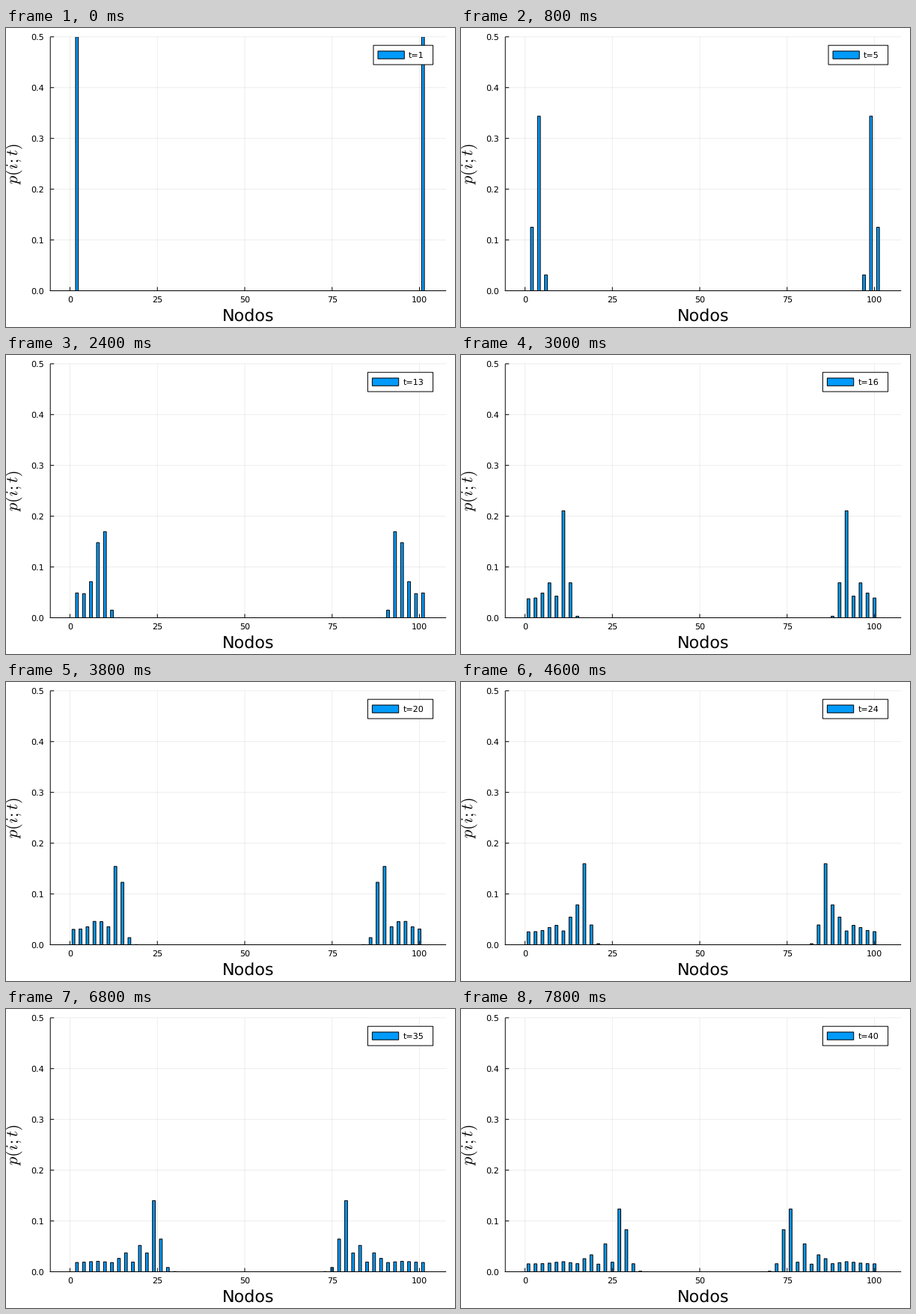
Write a matplotlib script that moves like this. It is 600 by 400 pixels and loops after 8 s.

```python
import numpy as np
import matplotlib.pyplot as plt
from matplotlib.animation import FuncAnimation
from matplotlib.patches import Rectangle

W, H, DPI = 600, 400, 100
PX = 72 / DPI                                  # one pixel in points
LEFT, RIGHT, TOP, BOTTOM = 59.2, 588.2, 11.8, 351.5
X_MIN, X_MAX, Y_MAX = -5.63, 107.63, 0.5
NODES, STEPS, BAR = 101, 40, 0.8
BLUE = "#009afa"

plt.rcParams.update({
    "font.family": "DejaVu Sans",
    "mathtext.fontset": "cm",
    "text.hinting": "none",
})


def px(x):
    return LEFT + (x - X_MIN) / (X_MAX - X_MIN) * (RIGHT - LEFT)


def py(y):
    return BOTTOM - y / Y_MAX * (BOTTOM - TOP)


def quantum_walk():
    """Node probabilities of a Hadamard walk on a ring, after each step."""
    psi = np.zeros((2, NODES), complex)
    psi[:, 0] = 1 / np.sqrt(2), 1j / np.sqrt(2)
    probs = []
    for _ in range(STEPS):
        up, down = (psi[0] + psi[1]) / np.sqrt(2), (psi[0] - psi[1]) / np.sqrt(2)
        psi = np.array([np.roll(up, 1), np.roll(down, -1)])
        probs.append((abs(psi) ** 2).sum(axis=0))
    return probs


fig = plt.figure(figsize=(W / DPI, H / DPI), dpi=DPI, facecolor="white")
ax = fig.add_axes([0, 0, 1, 1])
ax.set_xlim(0, W)
ax.set_ylim(H, 0)
ax.axis("off")


def line(x0, y0, x1, y1, z=3, **style):
    ax.plot([x0, x1], [y0, y1], color="black", lw=PX, snap=False,
            solid_capstyle="butt", zorder=z, **style)


def box(x, y, w, h, fill, z):
    rect = Rectangle((x, y), w, h, fc=fill, ec="black", lw=PX,
                     snap=False, joinstyle="miter", zorder=z)
    return ax.add_patch(rect)


def label(x, y, text, size=8, **kw):
    return ax.text(x, y, text, fontsize=size, zorder=6, **kw)


for v in range(0, 101, 25):
    x = px(v)
    line(x, TOP, x, BOTTOM, z=1, alpha=0.07)
    line(x, BOTTOM, x, BOTTOM - 5)
    label(x, 367.2, str(v), ha="center")
for i in range(6):
    y = py(i / 10)
    line(LEFT, y, RIGHT, y, z=1, alpha=0.07)
    line(LEFT, y, LEFT + 5, y)
    label(51, y + 4.1, f"{i / 10:.1f}", ha="right")
line(LEFT, TOP, LEFT, BOTTOM + 0.5)
line(LEFT - 0.5, BOTTOM, RIGHT, BOTTOM)
label((LEFT + RIGHT) / 2, 393, "Nodos", 16, ha="center")
label(20, (TOP + BOTTOM) / 2, "$p(i;t)$", 16, rotation=90,
      ha="right", va="center", rotation_mode="default").set_x(25.5)

area = Rectangle((LEFT, TOP), RIGHT - LEFT, BOTTOM - TOP, transform=ax.transData)
bars = []
for n in range(1, NODES + 1):
    left = px(n - BAR / 2)
    bar = box(left, BOTTOM, px(n + BAR / 2) - left, 0, BLUE, 2)
    bar.set_clip_path(area)
    bars.append(bar)

legend = box(491, 23.2, 79.6, 25.8, "white", 4)
swatch = box(497, 30.9, 35.3, 10.3, BLUE, 5)
caption = label(538, 40.2, "")

probs = quantum_walk()


def draw(k):
    for bar, p in zip(bars, probs[k]):
        top = py(p)
        bar.set_y(top)
        bar.set_height(BOTTOM - top)
    text = f"t={k + 1}"
    shift = 7.6 * (len(text) - 3)
    legend.set_x(491 - shift)
    legend.set_width(79.6 + shift)
    swatch.set_x(497 - shift)
    caption.set_x(538 - shift)
    caption.set_text(text)
    return [*bars, legend, swatch, caption]


anim = FuncAnimation(fig, draw, frames=STEPS, interval=200,
                     repeat=True, repeat_delay=0)
plt.show()
```
